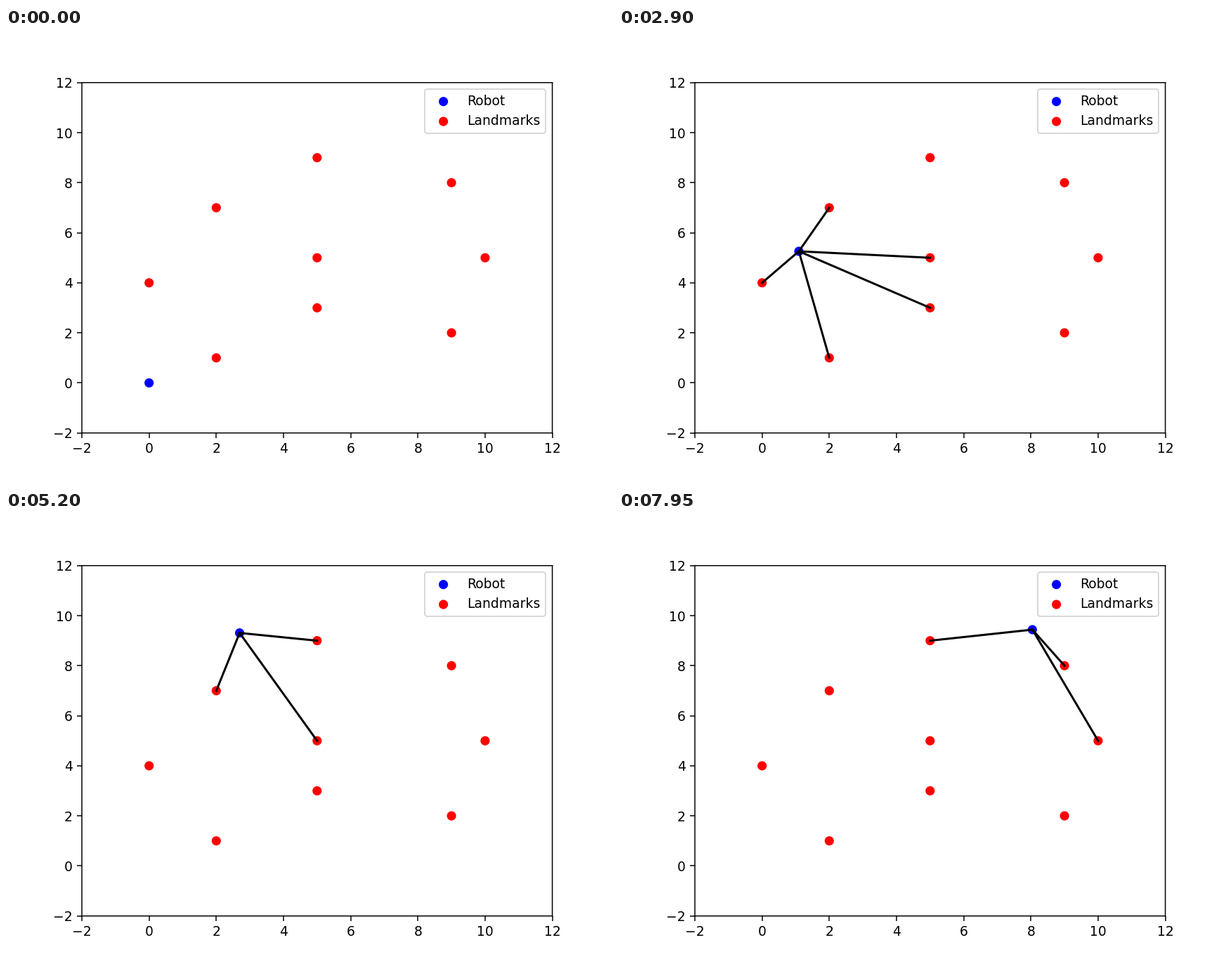
Animation of 864 by 648 pixels, one loop 8 s. Source, as a matplotlib script:

```python
import numpy as np
import matplotlib.pyplot as plt
from matplotlib.animation import FuncAnimation

FRAMES = 160
INTERVAL = 50
SPEED = 0.1          # distance per step
SENSOR_RANGE = 5.0

LANDMARKS = np.array([(2, 1), (5, 3), (9, 2), (0, 4), (5, 5),
                      (10, 5), (2, 7), (9, 8), (5, 9)])

# The robot drives at constant speed and steers steadily between headings.
TURN_STEPS = [0, 14.5, 72, 120, 142, 159]
HEADINGS = [0, 88, 88, 3, 0, -27]


def drive():
    """Positions at every step, starting from the origin."""
    middles = np.arange(FRAMES - 1) + 0.5
    angle = np.radians(np.interp(middles, TURN_STEPS, HEADINGS))
    moves = SPEED * np.column_stack([np.cos(angle), np.sin(angle)])
    return np.vstack([np.zeros(2), np.cumsum(moves, axis=0)])


def dots(points, color, label):
    points = np.atleast_2d(points)
    group = ax.scatter(points[:, 0], points[:, 1], color=color, label=label)
    # More than one face colour keeps dots off the pixel grid.
    group.set_facecolor([color, color])
    return group


path = drive()
fig, ax = plt.subplots(figsize=(6.4, 4.8), dpi=135)
ax.set_xlim(-2, 12)
ax.set_ylim(-2, 12)
for spine in ax.spines.values():
    spine.set_snap(False)

robot = dots(path[0], "blue", "Robot")
dots(LANDMARKS, "red", "Landmarks")
beams = [ax.plot([], [], color="black", lw=1.6)[0] for _ in LANDMARKS]
ax.legend(loc="upper right")


def update(step):
    pos = path[step]
    robot.set_offsets([pos])
    for beam, mark in zip(beams, LANDMARKS):
        beam.set_data(*zip(pos, mark))
        near = np.hypot(*(mark - pos)) < SENSOR_RANGE
        beam.set_visible(bool(step > 0 and near))
    return [robot, *beams]


def reset():
    return update(0)


anim = FuncAnimation(fig, update, frames=FRAMES, init_func=reset,
                     interval=INTERVAL, repeat=True, repeat_delay=0, blit=False)
plt.show()
```
